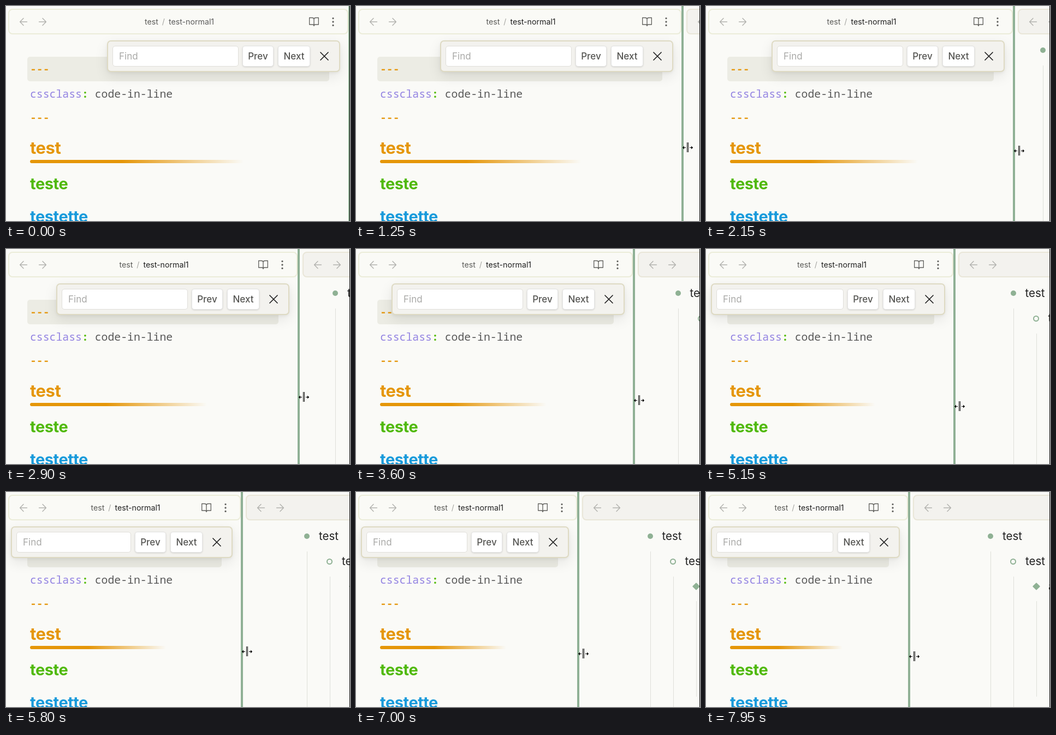
These frames come from a looping animation (630x394 px, 8000 ms). An HTML page:

```html
<!DOCTYPE html>
<html lang="en">
<head>
<meta charset="utf-8">
<title>Resizing panes</title>
<style>
  html, body { margin: 0; width: 100%; height: 100%; overflow: hidden; background: #fafaf7; }
  #stage {
    --d: 629px;
    position: relative; width: 630px; height: 394px; overflow: hidden;
    background: #fafaf7; font-family: Inter, sans-serif; color: #222;
  }
  #stage * { position: absolute; box-sizing: border-box; white-space: pre; }
  #stage .title *, #stage .code * { position: static; }
  svg { fill: none; stroke: currentColor; stroke-linecap: round; stroke-linejoin: round; overflow: visible; }

  .pane { top: 0; height: 100%; overflow: hidden; background: #fafaf7; }
  .left { left: 0; width: var(--d); }
  .right { left: var(--d); right: 0; }
  .header { top: 5px; height: 47px; border: 2px solid #ebecd9; border-radius: 8px; }
  .left .header { left: 4px; width: calc(var(--d) - 6px); background: #fafaf6; }
  .right .header { left: 7px; width: 640px; background: #f3f2ee; border-color: #e9e6d8; }
  .icon { top: 18px; width: 22px; height: 22px; stroke-width: 1.6; color: #b3b3af; }
  .back { left: 21px; }
  .forward { left: 56px; }
  .right .back { left: 24px; }
  .right .forward { left: 59px; }
  .book { left: calc(var(--d) - 75px); top: 19px; width: 20px; height: 20px; color: #62625f; }
  .more { left: calc(var(--d) - 41px); color: #62625f; }
  .title {
    left: calc(var(--d) / 2 + 3px); top: 9px; transform: translateX(-50%);
    display: flex; gap: 7px; font-size: 14.2px; line-height: 40px; color: #5c5c59;
  }
  .title i { color: #a5a5a1; font-style: normal; }

  .line { left: 39px; top: 93px; width: calc(var(--d) - 76px); height: 45px; border-radius: 5px; background: #ecece4; }
  .code { left: 44px; font: 19.8px/40px "Noto Sans Mono", monospace; color: #585858; }
  .mark { color: #e59a14; font-weight: 600; }
  .key { color: #9282e2; }
  .colon { color: #55bb0c; font-weight: 700; }
  .heading { left: 44px; font-size: 29px; font-weight: 650; line-height: 40px; letter-spacing: -.015em; }
  .rule {
    left: 44px; top: 282px; height: 6px; width: calc(var(--d) - 86px); border-radius: 3px;
    background: linear-gradient(90deg, #e59609 31%, #e5960900 72%);
  }

  .find {
    left: calc(var(--d) - 444px); top: 63px; width: 427px; height: 58px;
    border: 2px solid #dedac3; border-radius: 7px; background: #f3f2ee;
    box-shadow: 0 8px 24px #00000017, 0 2px 5px #0000000d;
  }
  .wide .find { left: 9px; width: calc(var(--d) - 26px); }
  .find div { top: 8px; height: 38px; border-radius: 5px; background: #fff; font-size: 17px; line-height: 38px; }
  .find .input { left: 8px; right: 184px; border: 1px solid #e0dfda; color: #a9a9a7; padding-left: 11px; line-height: 37px; }
  .find .button { text-align: center; font-weight: 500; color: #555552; box-shadow: inset 0 0 0 1px #0000001a, 0 1px 3px #00000026; }
  .find .prev { right: 120px; width: 57px; }
  .find .next { right: 53px; width: 59px; }
  .compact .prev { display: none; }
  .compact .find .input { right: 120px; }
  .close { right: 13px; top: 13px; width: 28px; height: 28px; stroke-width: 1.5; }

  .outline { left: calc(335px - var(--d) / 2); top: 0; }
  .item { font-size: 20.5px; line-height: 40px; }
  .guide { width: 1px; background: #dedfd9; }
  .bullet { width: 10px; height: 10px; border-radius: 50%; background: #8fb194; }
  .ring { width: 11px; height: 11px; border: 2px solid #8fb194; background: none; }
  .diamond { border-radius: 1px; transform: rotate(45deg); }

  .divider { left: calc(var(--d) - 2px); top: 0; width: 4px; height: 100%; background: #8fb095; }
  .cursor { left: calc(var(--d) - 1px); top: var(--y); width: 21px; height: 18px; color: #000; stroke-width: 1; stroke-linecap: butt; }
  .edge { left: 629px; top: 0; width: 1px; height: 100%; background: #111; }
</style>
</head>
<body>
<div id="stage">
  <svg width="0" height="0">
    <symbol id="arrow" viewBox="0 0 24 24"><path d="M19 12H5M12 19l-7-7 7-7"/></symbol>
    <symbol id="book" viewBox="0 0 24 24"><path d="M2 3h6a4 4 0 0 1 4 4v14a3 3 0 0 0-3-3H2zM22 3h-6a4 4 0 0 0-4 4v14a3 3 0 0 1 3-3h7z"/></symbol>
    <symbol id="dots" viewBox="0 0 24 24"><path d="M12 5h.01M12 12h.01M12 19h.01" stroke-width="3.6"/></symbol>
    <symbol id="cross" viewBox="0 0 24 24"><path d="M18 6 6 18M6 6l12 12"/></symbol>
  </svg>

  <div class="pane left">
    <div class="header"></div>
    <svg class="icon back"><use href="#arrow"/></svg>
    <svg class="icon forward"><use href="#arrow" transform="matrix(-1 0 0 1 22 0)"/></svg>
    <div class="title"><span>test</span><i>/</i><span id="name">test-normal1</span></div>
    <svg class="icon book"><use href="#book"/></svg>
    <svg class="icon more"><use href="#dots"/></svg>

    <div class="line"></div>
    <div class="code mark" style="top:95px">---</div>
    <div class="code" style="top:141px"><span class="key">cssclass</span><span class="colon">:</span> code-in-line</div>
    <div class="code mark" style="top:184px">---</div>
    <div class="heading" style="top:240px;font-size:31px;color:#e59609">test</div>
    <div class="rule"></div>
    <div class="heading" style="top:306px;color:#50b90a">teste</div>
    <div class="heading" style="top:366px;color:#189adb">testette</div>

    <div class="find">
      <div class="input">Find</div>
      <div class="button prev">Prev</div>
      <div class="button next">Next</div>
      <svg class="close"><use href="#cross"/></svg>
    </div>
  </div>

  <div class="pane right">
    <div class="header"></div>
    <svg class="icon back"><use href="#arrow"/></svg>
    <svg class="icon forward"><use href="#arrow" transform="matrix(-1 0 0 1 22 0)"/></svg>
    <div class="outline">
      <div class="guide" style="left:0;top:109px;height:290px"></div>
      <div class="guide" style="left:42px;top:155px;height:240px"></div>
      <div class="guide" style="left:84px;top:200px;height:175px"></div>
      <div class="bullet" style="left:-5px;top:76px"></div>
      <div class="bullet ring" style="left:36px;top:122px"></div>
      <div class="bullet diamond" style="left:79px;top:168px"></div>
      <div class="item" style="left:22px;top:61px">test</div>
      <div class="item" style="left:64px;top:107px">test</div>
      <div class="item" style="left:106px;top:153px">a</div>
    </div>
  </div>

  <div class="divider"></div>
  <svg class="cursor" viewBox="0 0 21 18">
    <path d="M9.5 0v18M11.5 0v18M1 9.5h6M14 9.5h6" stroke="#000" shape-rendering="crispEdges"/>
    <path d="M1 9.5l3-3v6zM20 9.5l-3-3v6z" fill="#000" stroke="none"/>
  </svg>
  <div class="edge"></div>
</div>

<script>
  const LOOP = 8000, STEP = 50;
  // time in ms, divider x, pointer y
  const path = [
    [0, 629, 254], [450, 629, 254], [2150, 564, 265], [3600, 509, 277],
    [4450, 480, 283], [5800, 432, 292], [7000, 407, 296], [7950, 372, 301]
  ];
  const stage = document.getElementById('stage');
  const name = document.getElementById('name');

  function at(time, column) {
    const next = Math.max(1, path.findIndex(point => point[0] >= time));
    const a = path[next - 1], b = path[next];
    return Math.round(a[column] + (b[column] - a[column]) * (time - a[0]) / (b[0] - a[0]));
  }

  function draw(now) {
    const time = Math.floor(now % LOOP / STEP) * STEP;
    const divider = at(time, 1);
    stage.style.setProperty('--d', divider + 'px');
    stage.style.setProperty('--y', at(time, 2) - 9 + 'px');
    stage.classList.toggle('wide', divider < 492);
    stage.classList.toggle('compact', divider < 390);
    const active = Math.min(1, time / 250);
    const shade = Math.round(92 - 60 * active);
    name.style.color = `rgb(${shade},${shade},${shade})`;
    requestAnimationFrame(draw);
  }
  draw(0);
</script>
</body>
</html>
```
